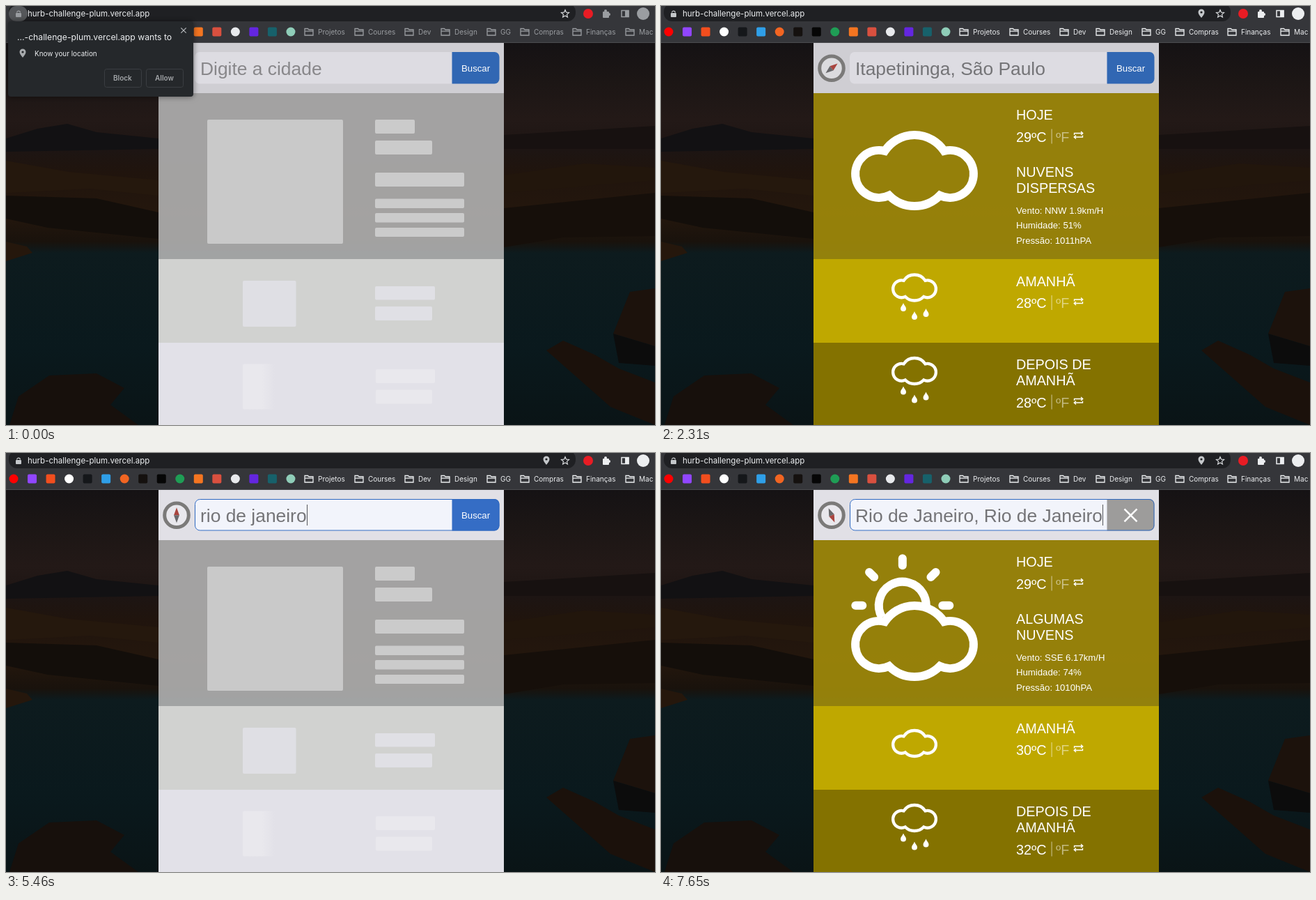
An HTML page with a canvas for the animation above (8 s loop, 932 px wide and 601 px high).

```html
<!DOCTYPE html>
<html lang="pt">
<head>
<meta charset="utf-8">
<style>
html, body { margin: 0; width: 100%; height: 100%; overflow: hidden; background: #111; }
canvas { display: block; }
</style>
</head>
<body>
<canvas id="stage" width="932" height="601"></canvas>
<script>
const ctx = document.getElementById('stage').getContext('2d');
const LOOP = 8000, TURN = 290;
const UI = 'Inter, sans-serif', PAGE = '"Liberation Sans", Arial, sans-serif';

const CLOUD = new Path2D('M-42.6-28A51 51 0 0 1 42.6-28A34 34 0 1 1 36.4 35.7A51 51 0 0 1-36.4 35.7A34 34 0 1 1-42.6-28Z');
const DROP = new Path2D('M0-6C1-3 4-.5 4 2A4 4 0 0 1-4 2C-4-.5-1-3 0-6Z');
const SWAP = new Path2D('M-6 0V-2.5H6M3.5-5L6.3-2.5L3.5 0M6 .5V3H-6M-3.5 .5L-6.3 3L-3.5 5.5');
const PIN = new Path2D('M0 6C-2 3-4.5 1-4.5-2A4.5 4.5 0 0 1 4.5-2C4.5 1 2 3 0 6ZM1.6-2A1.6 1.6 0 1 0-1.6-2A1.6 1.6 0 1 0 1.6-2Z');
const STAR = new Path2D('M0-5.5L1.6-1.8L5.5-1.5L2.5 1.1L3.4 5L0 2.9L-3.4 5L-2.5 1.1L-5.5-1.5L-1.6-1.8Z');
const FOLDER = new Path2D('M-6-4.5H-1.5L0-3H6V5H-6ZM-6-.8H6');

const bookmarkColors = ['#f00', '#9146ff', '#f24e1e', '#fff', '#15171a', '#2f9fe8', '#f26522', '#15110f',
  '#060606', '#1f9d55', '#f47521', '#d9503f', '#e8eaed', '#6426e0', '#17616b', '#8fcdb8'];
const folders = { Projetos: 448, Courses: 520, Dev: 592, Design: 644, GG: 710, Compras: 758, 'Finanças': 833, 'Mac A': 909 };

const first = {
  sky: ['NUVENS', 'DISPERSAS'], info: ['Vento: NNW 1.9km/H', 'Humidade: 51%', 'Pressão: 1011hPA'],
  temps: [29, 28, 28], sun: false, rain: true
};
const second = {
  sky: ['ALGUMAS', 'NUVENS'], info: ['Vento: SSE 6.17km/H', 'Humidade: 74%', 'Pressão: 1010hPA'],
  temps: [29, 30, 32], sun: true, rain: false
};

function rect(x, y, w, h, color, radius = 0) {
  ctx.fillStyle = color;
  ctx.beginPath();
  ctx.roundRect(x, y, w, h, radius);
  ctx.fill();
}

function disc(x, y, r, color) {
  ctx.fillStyle = color;
  ctx.beginPath();
  ctx.arc(x, y, r, 0, 7);
  ctx.fill();
}

function arc(x, y, r, from, to, color, width) {
  ctx.strokeStyle = color;
  ctx.lineWidth = width;
  ctx.beginPath();
  ctx.arc(x, y, r, from, to);
  ctx.stroke();
}

function poly(color, ...points) {
  ctx.fillStyle = color;
  ctx.beginPath();
  for (let i = 0; i < points.length; i += 2) ctx.lineTo(points[i], points[i + 1]);
  ctx.fill();
}

function line(x1, y1, x2, y2, color, width) {
  ctx.strokeStyle = color;
  ctx.lineWidth = width;
  ctx.beginPath();
  ctx.moveTo(x1, y1);
  ctx.lineTo(x2, y2);
  ctx.stroke();
}

function text(str, x, y, size, color, family = PAGE, weight = 400) {
  ctx.font = `${weight} ${size}px ${family}`;
  ctx.fillStyle = color;
  ctx.fillText(str, x, y);
}

// Fills a path, or strokes it when a line width is given.
function icon(path, x, y, color, width = 0, scale = 1) {
  ctx.save();
  ctx.translate(x, y);
  ctx.scale(scale, scale);
  ctx.fillStyle = ctx.strokeStyle = color;
  ctx.lineWidth = width;
  width ? ctx.stroke(path) : ctx.fill(path, 'evenodd');
  ctx.restore();
}

function cross(x, y, r, color, width) {
  line(x - r, y - r, x + r, y + r, color, width);
  line(x - r, y + r, x + r, y - r, color, width);
}

function landscape() {
  const g = ctx.createLinearGradient(0, 53, 0, 601);
  [[0, '#151214'], [.1, '#1c1615'], [.2, '#231917'], [.28, '#1d1513'], [.34, '#20140d'], [.45, '#24170d'],
   [.52, '#19120c'], [.55, '#0d1b1e'], [.8, '#0a191d'], [1, '#0a1416']].forEach(s => g.addColorStop(...s));
  rect(0, 53, 932, 548, g);
  poly('#121113', 0, 190, 45, 176, 88, 169, 130, 181, 219, 190, 219, 205, 0, 209);
  poly('#171110', 715, 185, 800, 180, 932, 172, 932, 205, 715, 205);
  poly('#25180d', 0, 222, 90, 238, 219, 250, 219, 272, 120, 262, 0, 268);
  poly('#130e0a', 0, 272, 130, 276, 219, 296, 219, 334, 60, 318, 0, 305);
  poly('#25170c', 0, 338, 30, 345, 38, 354, 0, 366);
  poly('#22160c', 715, 243, 830, 226, 932, 232, 932, 250, 715, 268);
  poly('#160f0a', 715, 290, 932, 268, 932, 330, 800, 332, 715, 346);
  poly('#17100c', 5, 601, 18, 560, 62, 530, 130, 527, 170, 548, 150, 572, 190, 601);
  poly('#1b110b', 776, 494, 800, 480, 845, 500, 880, 520, 932, 540, 932, 601, 868, 575);
  poly('#1c120c', 872, 470, 896, 410, 932, 405, 932, 488);
  poly('#0c0c0c', 872, 470, 932, 488, 932, 516, 880, 512);
}

function browserBar(active) {
  const tint = active ? '#eceef0' : '#9a9da1', soft = active ? '#c4c7ca' : '#9a9da1';
  rect(0, 0, 932, 53, '#35363a');
  rect(0, 52, 932, 1, '#4b4c50');
  rect(4, -4, 814, 26, '#1f2023', 12);
  if (!active) rect(4, 0, 27, 22, '#55575a', 11);
  rect(14, 10, 8, 6, soft, 1);
  arc(18, 9.5, 2.4, Math.PI, 0, soft, 1.2);
  text('hurb-challenge-plum.vercel.app', 31, 15, 11.5, '#eceef0', UI);
  if (active) icon(PIN, 776, 11, '#c4c7ca');
  icon(STAR, 803, 11, '#d5d7da', 1.2);
  disc(836, 11, 7, '#e81c24');
  rect(857, 8, 9, 9, tint, 1);
  disc(861, 7, 2, tint);
  disc(866, 12, 2, tint);
  ctx.strokeStyle = tint;
  ctx.lineWidth = 1.5;
  ctx.strokeRect(884, 6.5, 10, 9);
  rect(889, 6, 5.5, 10, tint);
  disc(915, 11, 9, tint);

  bookmarkColors.forEach((color, i) => {
    const x = 11 + i * 26.53;
    i % 3 ? rect(x - 6.5, 30.5, 13, 13, color, 2) : disc(x, 37, 6.5, color);
  });
  for (const [label, x] of Object.entries(folders)) {
    icon(FOLDER, x - 13, 37, tint, 1.3);
    text(label, x, 41, 10, tint, UI);
  }
}

function permissionPopup(alpha) {
  ctx.save();
  ctx.globalAlpha = alpha;
  ctx.shadowColor = 'rgba(0,0,0,.5)';
  ctx.shadowBlur = 8;
  rect(3, 22, 266, 108, '#25282b', 4);
  ctx.shadowBlur = 0;
  text('…-challenge-plum.vercel.app wants to', 16, 49, 12.2, '#eceef0', UI);
  cross(255, 35, 3.7, '#b5b8bb', 1.2);
  icon(PIN, 24, 68, '#a8abae');
  text('Know your location', 41, 72, 9.9, '#eceef0', UI);
  ctx.strokeStyle = '#3b3e42';
  ctx.lineWidth = 1;
  for (const [label, x] of [['Block', 141], ['Allow', 201]]) {
    ctx.beginPath();
    ctx.roundRect(x + .5, 90.5, 53, 26, 3);
    ctx.stroke();
    text(label, x + 13, 107, 10, '#a3a6a9', UI, 600);
  }
  ctx.restore();
}

function compass(angle) {
  ctx.save();
  ctx.translate(245, 89.3);
  disc(0, 0, 17, 'rgba(255,255,255,.25)');
  arc(0, 0, 17.3, 0, 7, '#7b7a79', 5);
  ctx.rotate(angle * Math.PI / 180);
  poly('#a9453f', -4, 0, 0, -11, 4, 0);
  poly('#68686b', -4, 0, 0, 11, 4, 0);
  ctx.restore();
}

function searchBar(t, s) {
  rect(219, 53, 496, 72, s.focused ? '#e1e0e6' : '#cfced3');
  compass(s.angle);
  rect(271, 66, 370, 45.5, s.focused ? '#f2f4fb' : '#dddce2', [7, 0, 0, 7]);
  ctx.font = `26.4px ${PAGE}`;
  const width = ctx.measureText(s.query).width;
  if (s.selected) rect(279, 74, width, 30, '#acd1fa');
  text(s.query || 'Digite a cidade', 279, 98.5, 26.4, s.query ? '#747477' : '#88878a');
  if (s.caret) rect(Math.round(279 + width), 74, 1, 30, '#55565a');

  rect(640.5, 66, 68, 45.5, s.loading || s.clearable ? '#9d9c9b' : s.focused ? '#356dc5' : '#3167b3', [0, 7, 7, 0]);
  if (s.loading) {
    const end = (t - 7380) / 1000 * Math.PI * 2 - 1.2;
    arc(674.5, 89, 14.5, 0, 7, 'rgba(255,255,255,.35)', 2);
    arc(674.5, 89, 14.5, end - 4.5, end, '#fff', 2.6);
  } else if (s.clearable) {
    cross(674.5, 89.3, 9, '#fff', 2.5);
  } else {
    text('Buscar', 654, 93.5, 13.2, '#fff');
  }
  if (s.focused) {
    ctx.strokeStyle = '#2e68c0';
    ctx.lineWidth = 1;
    ctx.beginPath();
    ctx.roundRect(271.5, 66.5, 436.5, 44.5, 7);
    ctx.stroke();
  }
}

function panels(today, tomorrow, later) {
  rect(219, 125, 496, 238, today);
  rect(219, 363, 496, 120, tomorrow);
  rect(219, 483, 496, 118, later);
}

function skeleton() {
  panels('rgba(178,178,178,.9)', '#d1d2d0', '#e2e1e8');
  rect(289, 163, 195, 178, '#c9c9c9', 2);
  [[163, 57, 20], [193, 82, 20], [239, 128, 20], [276.5, 128, 13.5], [297, 128, 13.5], [318, 128, 13]]
    .forEach(([y, w, h]) => rect(530, y, w, h, '#cbcbcb', 2));
  rect(340, 394, 76.5, 66, '#dfdfe4', 2);
  rect(530, 402, 86, 19.5, '#e0e0e5', 2);
  rect(530, 431, 82, 20, '#e0e0e5', 2);
  const fade = ctx.createLinearGradient(340, 0, 386, 0);
  fade.addColorStop(.6, '#e9e8ed');
  fade.addColorStop(1, '#e2e1e8');
  rect(340, 513.5, 76, 65, fade, 2);
  rect(531, 521, 85, 20, '#e9e8ed', 2);
  rect(531, 550.5, 81, 20, '#e9e8ed', 2);
}

function temperature(value, y) {
  text(value + 'ºC', 510, y, 19.8, '#fff');
  rect(560.5, y - 18, 1.2, 21, 'rgba(255,255,255,.5)');
  text('ºF', 567, y, 19.8, 'rgba(255,255,255,.5)');
  icon(SWAP, 599.5, y - 9.5, '#fff', 1.3);
}

function smallCloud(y, rain) {
  icon(CLOUD, 364, y, '#fff', 12, .363);
  if (rain) [[-16, 28], [0, 40], [16.5, 36]].forEach(([dx, dy]) => icon(DROP, 364 + dx, y + dy, '#fff'));
}

function sun(x, y) {
  arc(x, y, 34, Math.PI * .83, Math.PI * 2, '#fff', 12);
  ctx.lineCap = 'round';
  for (let i = 0; i < 5; i++) {
    const a = Math.PI * (1 + i / 4), c = Math.cos(a), s = Math.sin(a);
    line(x + 57.5 * c, y + 57.5 * s, x + 67.5 * c, y + 67.5 * s, '#fff', 12);
  }
  ctx.lineCap = 'butt';
}

function forecast(w) {
  panels('rgba(162,140,11,.9)', '#bfa800', '#847200');
  if (w.sun) sun(346.8, 218.7);
  icon(CLOUD, 364, w.sun ? 270 : 236, '#fff', 12);
  const heading = (str, y) => text(str, 510, y, 19.8, '#fff');
  heading('HOJE', 163);
  temperature(w.temps[0], 194.5);
  heading(w.sky[0], 244.5);
  heading(w.sky[1], 267.5);
  w.info.forEach((str, i) => text(str, 510, 297.5 + i * 21.5, 13.2, '#fff'));
  smallCloud(w.rain ? 404 : 416.5, w.rain);
  heading('AMANHÃ', 401.5);
  temperature(w.temps[1], 433);
  smallCloud(523.5, true);
  heading('DEPOIS DE', 520.5);
  heading('AMANHÃ', 544);
  temperature(w.temps[2], 575.5);
}

function query(t) {
  if (t < 2080) return '';
  if (t < 4320) return 'Itapetininga, São Paulo';
  if (t < 4920) return 'rio de '.slice(0, 1 + (t - 4320) / 75);
  if (t < 6660) return 'rio de janeiro'.slice(0, 8 + (t - 4920) / 90);
  return 'Rio de Janeiro, Rio de Janeiro';
}

function turned(t, start) {
  const p = Math.min(1, Math.max(0, (t - start) / TURN));
  return 1 - (1 - p ** 1.5) ** 3;
}

function draw(t) {
  const between = (a, b) => t >= a && t < b;
  const weather = between(2270, 4320) ? first : t >= 7395 ? second : null;
  landscape();
  weather ? forecast(weather) : skeleton();
  searchBar(t, {
    query: query(t),
    focused: t >= 3210,
    selected: between(3600, 4320),
    loading: between(1890, 2270) || between(5850, 7395),
    clearable: t >= 7395,
    caret: between(4320, 5960) || between(6460, 6960) || t >= 7460,
    angle: 337.5 * (turned(t, 2270) - turned(t, 4320)) + 157.5 * turned(t, 7395)
  });
  browserBar(t >= 1050);
  if (t < 1110) permissionPopup(t < 1020 ? 1 : .75 - .25 * Math.floor((t - 1020) / 30));
}

function tick(now) {
  draw(now % LOOP);
  requestAnimationFrame(tick);
}
requestAnimationFrame(tick);
</script>
</body>
</html>
```
